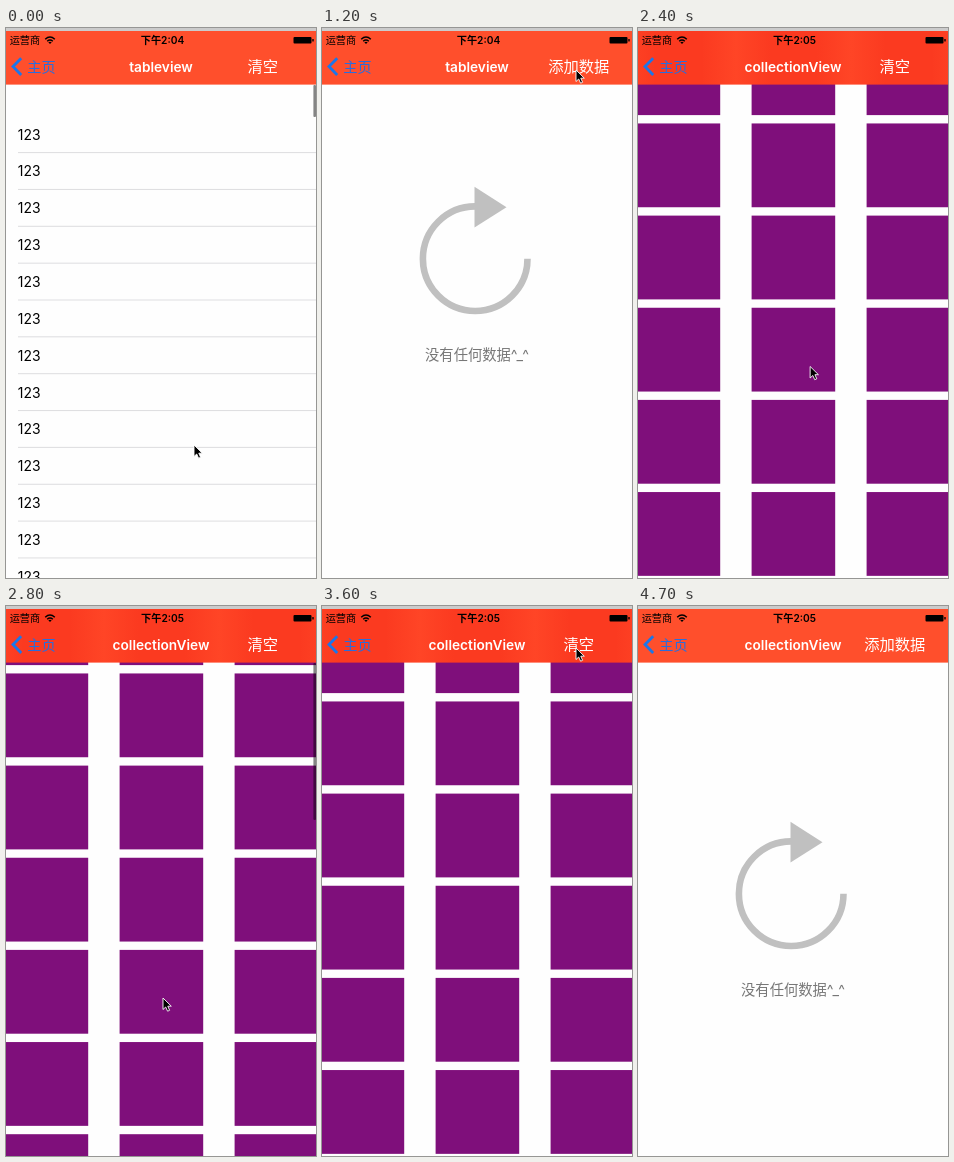
An HTML page that plays this animation: 310 by 550 pixels, repeating every 4.8 s.

```html
<!DOCTYPE html>
<html lang="zh-CN">
<head>
<meta charset="utf-8">
<style>
html, body { margin: 0; width: 100%; height: 100%; overflow: hidden; background: #fefefe; }
svg { display: block; width: 310px; height: 550px; }
text { font-family: Inter, "Noto Sans CJK SC", "Noto Sans CJK", sans-serif; }
.mid { text-anchor: middle; }
.nav { fill: #fff; font-size: 15.3px; }
.status { font-size: 10.2px; }
#title { font-size: 13.7px; font-weight: 600; }
#table text { font-size: 13.9px; }
</style>
</head>
<body>
<svg viewBox="0 0 310 550">
  <linearGradient id="tint" gradientUnits="userSpaceOnUse" x1="40.5" x2="98" spreadMethod="reflect">
    <stop offset=".4" stop-color="#fb3a20"/>
    <stop offset="1" stop-color="#ff4526"/>
  </linearGradient>
  <g id="table"></g>
  <g id="grid" fill="#7f0f7b"></g>
  <g id="empty">
    <path d="M205.5 230.7A52.3 52.3 0 1 1 153.2 178.4" fill="none" stroke="#c0c0c0" stroke-width="6.6"/>
    <path d="M152.5 158.7L184.5 179.2L152.5 199.5Z" fill="#c0c0c0"/>
    <text class="mid" x="155" y="331.7" font-size="14.3" fill="#777">没有任何数据^_^</text>
  </g>
  <rect id="thumb" x="307.4" y="57" width="2.6" rx="1" opacity=".48"/>
  <rect id="bar" y="3" width="310" height="53.6"/>
  <rect width="310" height="3" fill="#cbcbcb"/>

  <text class="status" x="3.7" y="15.8">运营商</text>
  <path d="M39.2 11.2Q44 6.8 48.8 11.2M41.2 13.3Q44 10.8 46.8 13.3" fill="none" stroke="#000" stroke-width="1.5"/>
  <path d="M42.3 14.3Q44 13 45.7 14.3L44 16Z"/>
  <text id="clock" class="status mid" x="156.5" y="15.8" font-weight="600"></text>
  <rect x="287.5" y="9" width="18" height="6.6" rx="1"/>
  <rect x="306.3" y="11" width="1.4" height="2.6" rx=".6"/>

  <path d="M15.2 30.3L7 38.6L15.2 46.9" fill="none" stroke="#1b76ea" stroke-width="2.8"/>
  <text x="21.3" y="43.8" font-size="14.2" font-weight="500" fill="#2a6ddc">主页</text>
  <text id="title" class="nav mid" x="155" y="43.5"></text>
  <text id="action" class="nav mid" x="256.8" y="44.2"></text>
  <path id="cursor" d="M0 0V11.5L2.7 9L4.6 13.2L6.6 12.3L4.8 8.2H8.3Z" stroke="#fff" stroke-width=".9"/>
</svg>
<script>
const $ = id => document.getElementById(id);
const LOOP = 4800, STEP = 100;
const SWITCH = 2200; // second screen opens
const clicks = [500, 900, 1200, SWITCH, 3000, 3400, 3800]; // each one fills or empties the list

const button = [254, 42];
const stops = [
  [0, 188, 417], [500, ...button], [700, 217, 87], [900, ...button], [1200, ...button],
  [1800, 200, 240], [2800, 157, 392], [3000, ...button], [3100, 251, 60],
  [3400, ...button], [3800, ...button], [4200, 312, 20]];

// Smooth 0..1 between two times
function ease(t, from, to) {
  const p = Math.min(1, Math.max(0, (t - from) / (to - from)));
  return p * p * (3 - 2 * p);
}

function cursorAt(t) {
  let [, x, y] = stops[0];
  for (let i = 1; i < stops.length; i++) {
    const [end, nx, ny] = stops[i], e = ease(t, stops[i - 1][0], end);
    x += (nx - x) * e;
    y += (ny - y) * e;
  }
  return [x, y];
}

const show = (id, on) => $(id).style.display = on ? "" : "none";
const move = (id, x, y) => $(id).setAttribute("transform", `translate(${x} ${y})`);

let rows = "", cells = "";
for (let i = 0; i < 15; i++) {
  const y = 57 + i * 36.85;
  rows += `<text x="11.8" y="${y + 23.6}">123</text>` +
    `<path d="M12 ${y + 36.6}H310" stroke="#d5d5d8" stroke-width=".8"/>`;
}
for (let i = 0; i < 21; i++)
  cells += `<rect x="${-1.4 + i % 3 * 115}" y="${3.3 + Math.floor(i / 3) * 92.15}" width="83.6" height="83.8"/>`;
$("table").innerHTML = rows;
$("grid").innerHTML = cells;

function draw(now) {
  const t = Math.floor(now % LOOP / STEP) * STEP;
  const second = t >= SWITCH;
  const full = clicks.filter(c => c <= t).length % 2 === 0;
  const grid = full && second;

  show("table", full && !second);
  show("grid", grid);
  show("empty", !full);
  move("table", 0, 31 * (1 - ease(t, 0, 200)));
  move("grid", 0, t < 3000 ? -28 * ease(t, 2400, 2800) : 0);
  move("empty", 0, 57 * ease(t, 1300, 1700));

  show("thumb", full && (t < 500 || t > 2400 && t < 3000));
  $("thumb").setAttribute("height", second ? 157 : 32);
  $("bar").setAttribute("fill", grid ? "url(#tint)" : "#ff4f2c");
  $("clock").textContent = second ? "下午2:05" : "下午2:04";
  $("title").textContent = second ? "collectionView" : "tableview";
  $("action").textContent = full ? "清空" : "添加数据";

  show("cursor", t < 1900 || t > 2300 && t < 4200);
  move("cursor", ...cursorAt(t));
}

const start = performance.now();
function tick() {
  draw(performance.now() - start);
  requestAnimationFrame(tick);
}
tick();
</script>
</body>
</html>
```
